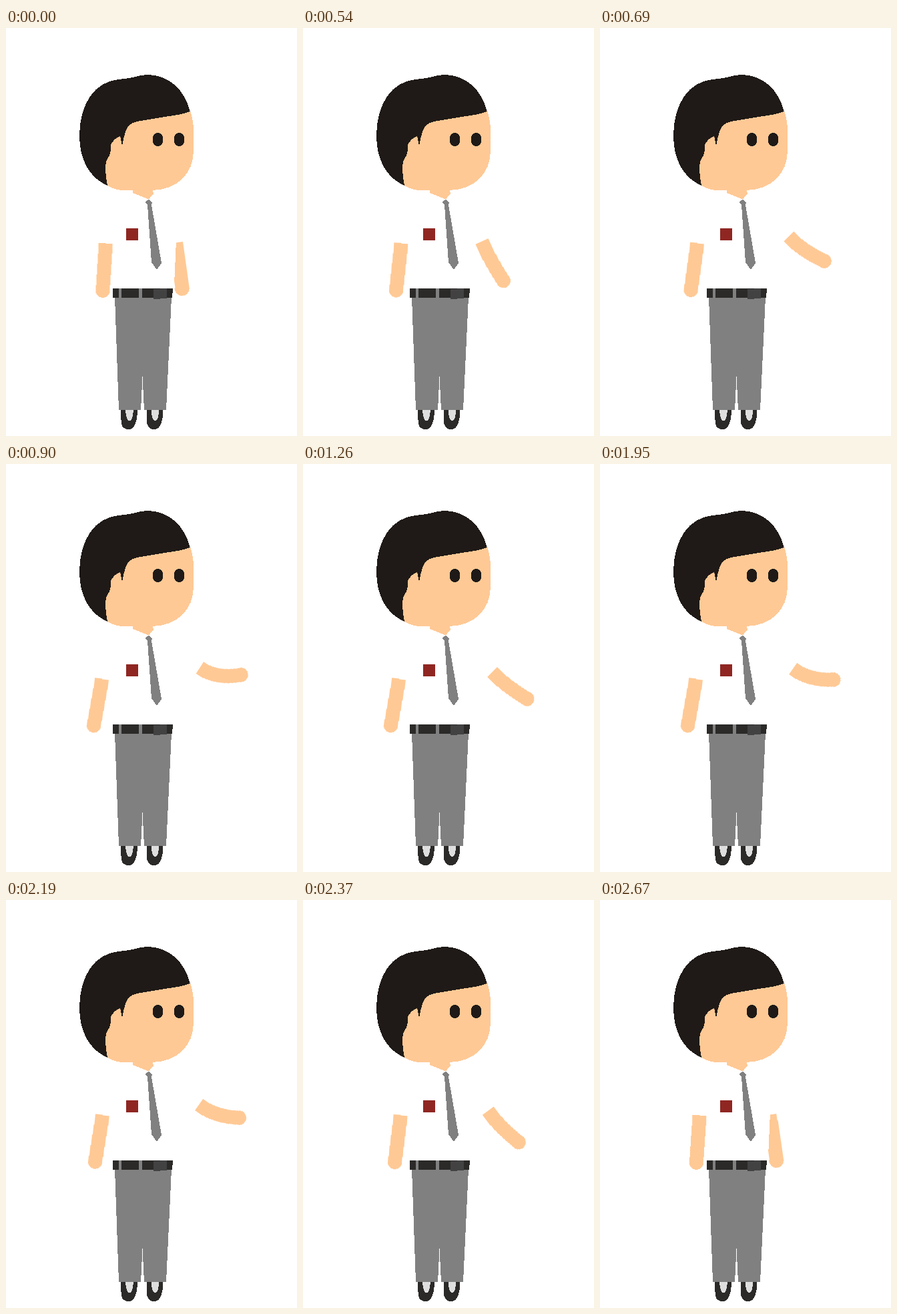
An HTML page without scripts that plays this animation: 436x611 px, repeating every 2.7 s.

```html
<!DOCTYPE html>
<html lang="en">
<head>
<meta charset="utf-8">
<title>Waving student</title>
<style>
  html, body { margin: 0; height: 100%; overflow: hidden; background: #fff; }
  svg { display: block; width: 100vw; height: 100vh; shape-rendering: crispEdges; }

  .skin { fill: #ffc995; }
  .hair { fill: #1f1a17; }
  .black { fill: #2b2a29; }
  .grey { fill: #808080; }
  .arm { fill: none; stroke: #ffc995; stroke-width: 21; marker-end: url(#hand); }

  /* Arms hang from their shoulder at 0 0; four equal strokes follow a short rest. */
  #still-arm { animation: swing 2.7s linear infinite; }
  #wave-arm {
    --straight: path("M-7 47Q-7 78 -7 116.5");
    --bent: path("M-7 47Q-7 78 18 104.5");
    animation: lift 2.7s ease-in-out infinite, bend 2.7s ease-in-out infinite;
  }

  @keyframes swing {
    0%, 11.11%, 100% { transform: rotate(0deg); }
    33.33%, 77.78% { transform: rotate(6.5deg); }
  }
  @keyframes lift {
    0%, 11.11%, 100% { transform: rotate(-8deg); }
    33.33%, 77.78% { transform: rotate(-57deg); }
    55.56% { transform: rotate(-40deg); }
  }
  @keyframes bend {
    0%, 55.56%, 100% { d: var(--straight); }
    11.11% { d: var(--straight); animation-timing-function: ease-in; }
    33.33% { d: var(--bent); }
    77.78% { d: var(--bent); animation-timing-function: ease-out; }
  }
</style>
</head>
<body>
<svg viewBox="0 0 436 611" preserveAspectRatio="none">
  <defs>
    <marker id="hand" markerUnits="userSpaceOnUse" markerWidth="24" markerHeight="24" refX="12" refY="12">
      <circle class="skin" cx="12" cy="12" r="10.8"/>
    </marker>
    <g id="shoe">
      <path class="black" d="M172 571H197Q197 584 194 592Q191 601 184 601Q175 601 173 593Q172 584 172 571Z"/>
      <path fill="#dedede" d="M179 571H191Q190 588 185 588Q180 588 179 571Z"/>
    </g>
  </defs>

  <g transform="translate(152.5 274)">
    <path id="still-arm" class="arm" d="M-3 48.5L-7.500 119"/>
  </g>
  <g transform="translate(254.5 274)">
    <path id="wave-arm" class="arm" d="M-7 47Q-7 78 -7 116.5"/>
  </g>

  <!-- shirt -->
  <path fill="#fff" d="M160 258H240L255 318L252 384L250 391H160Z"/>

  <!-- legs -->
  <use href="#shoe"/>
  <use href="#shoe" x="38.5"/>
  <path class="grey" d="M163 403H248L240 572H207L204.5 522L202 572H169Z"/>

  <!-- belt -->
  <path class="black" d="M160 390H250L249 404H160Z"/>
  <path class="grey" d="M169 390h4v14h-4zM199 390h4.5v15h-4.5z"/>
  <path fill="#434242" d="M221 391L241 390V405L221 406Z"/>

  <!-- head -->
  <path class="skin" d="M190 240V247L214 256.5L221 248L219 240Z"/>
  <path class="skin" d="M152 236L140 200L160 140L200 120L276 124Q281 138 281 155V184C281 218 256 243 218 243H176Q164 243 152 236Z"/>
  <path class="hair" d="M152 236C125 224 110 198 110 160C111 112 133 81 168 77Q180 76 190 74Q203 70 215 70C245 72 267 92 276 125Q262 130 244 132L196 140Q183 143 179 155Q176 165 174 176L171 162Q162 165 157 175Q158 182 155 191Q149 199 149 209Q149 222 152 236Z"/>
  <ellipse class="hair" cx="227.5" cy="167" rx="8" ry="10.2"/>
  <ellipse class="hair" cx="259.5" cy="167" rx="8" ry="10.2"/>

  <!-- tie and badge -->
  <path class="grey" d="M208 261L214 256.5L219 261L218 265L233 352L226 362L218 351L212 265Z"/>
  <rect x="180" y="300" width="18" height="18" fill="#8f2622"/>
</svg>
</body>
</html>
```
